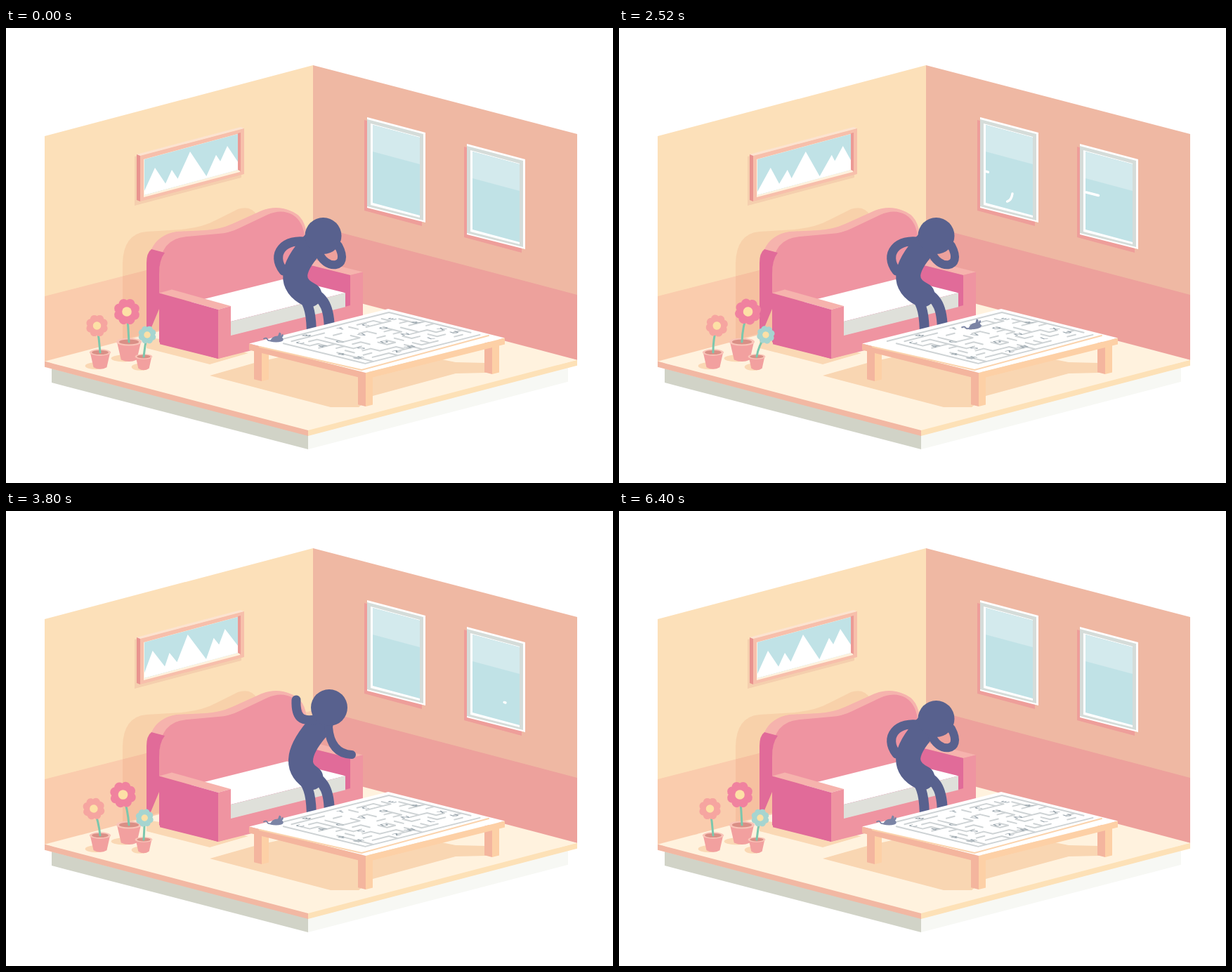
Recreate the animation shown at these times as an HTML page. Size 864 by 648 pixels, loop 6.92 s.

```html
<!DOCTYPE html>
<html lang="en">
<head>
<meta charset="utf-8">
<title>Maze on the table</title>
<style>
html, body { margin: 0; width: 100%; height: 100%; overflow: hidden; background: #fff; }
svg { display: block; width: 100%; height: 100%; }
.line { fill: none; stroke-linecap: round; stroke-linejoin: round; }
#letters { font: 700 13px "Open Sans", sans-serif; fill: #98a4ac; text-anchor: middle; }
</style>
</head>
<body>
<svg viewBox="0 0 864 648">
  <defs>
    <clipPath id="view"><path d="M197 187 330 151V202L197 238z"/></clipPath>
    <g id="window">
      <path fill="#ee9e9a" d="M510 131 592 153V282L510 260z"/>
      <path fill="#fff" d="M514 127 597 149V277L514 256z"/>
      <path fill="#d5dcd9" d="M514 130 594 151V274L514 254z"/>
      <path fill="#fff" d="M519 136 589 155V270L519 252z"/>
      <path fill="#c0e2e6" d="M522 138 589 156V267L522 249z"/>
      <path fill="#d3eaed" d="M522 138 589 156V194L522 176z"/>
    </g>
  </defs>

  <!-- walls and floor -->
  <path fill="#fce0b9" d="M55 154 437 53V380L55 480z"/>
  <path fill="#faccad" d="M55 382 437 284V380L55 480z"/>
  <path fill="#efb8a3" d="M437 53 813 151V473L437 380z"/>
  <path fill="#eda19c" d="M437 281 813 380V473L437 380z"/>
  <g id="floor"></g>

  <!-- picture -->
  <path fill="#f5cfae" d="M183 183 335 145V213L183 253z"/>
  <path fill="#fce3d0" d="M186 180 334 141 339 143 191 183z"/>
  <path fill="#e9938f" d="M186 180 191 182V247L186 245z"/>
  <path fill="#f7bfab" d="M191 182 339 143V208L191 247z"/>
  <path fill="#fff2de" d="M196 187 333 150V205L196 241z"/>
  <path fill="#ec9a95" d="M330 150 334 149V204L330 202z"/>
  <g clip-path="url(#view)">
    <path fill="#c0e2e6" d="M190 140H340V250H190z"/>
    <path id="peaks" fill="#fff"/>
  </g>

  <use href="#window"/>
  <use href="#window" x="142" y="38"/>
  <g id="gusts" class="line" stroke="#fff" stroke-width="3.4"></g>

  <!-- sofa -->
  <path fill="#dd8060" opacity=".16" d="M166 444V335Q167 293 200 290L250 287Q280 284 300 273L330 258Q348 252 357 266V390L200 435z"/>
  <path fill="#fad8b4" d="M200 456 290 479 345 463 200 440z"/>
  <path fill="#f6b3ad" d="M207 315Q217 294 243 290L284 288Q304 287 322 279L364 260Q385 252 404 260Q428 268 428 300L320 340 224 330z"/>
  <path fill="#ef94a1" d="M218 345Q219 299 258 297L302 293Q318 292 332 285L372 266Q392 257 408 266Q424 276 425 300V362L286 390 218 378z"/>
  <path fill="#e16b99" d="M200 443V335Q200 320 207 315L226 320Q218 330 218 350V400z"/>
  <g id="sofa"></g>

  <g id="person" class="line" stroke="#58618e"></g>
  <circle id="head" r="26" fill="#58618e"/>

  <!-- table -->
  <path fill="#f9d6b2" d="M290 495 357 476 420 462 610 470 640 476 683 477V491L640 492 522 524 502 540H462z"/>
  <g id="table"></g>
  <path class="line" stroke="#fbd3ac" stroke-width="2" d="M361 454 506 487 687 438"/>
  <path id="maze" class="line" stroke="#ced3d5" stroke-width="2"/>
  <g id="letters"></g>
  <g id="mouse">
    <path class="line" stroke="#7b84a5" stroke-width="1.8" d="M-6 2Q-12 4-13 1T-18 0"/>
    <path fill="#7b84a5" d="M-9 4Q-7-4 2-4L4-9Q8-8 6-4L9-7Q11-4 8-2Q12 2 7 4Q0 6-9 4z"/>
  </g>
  <g id="flowers"></g>
</svg>

<script>
const LOOP = 6920, STEP = 40;
const $ = id => document.getElementById(id);

function set(el, attrs) {
  for (const k in attrs) el.setAttribute(k, attrs[k]);
}
function add(parent, tag, attrs = {}) {
  const el = document.createElementNS('http://www.w3.org/2000/svg', tag);
  set(el, attrs);
  return parent.appendChild(el);
}
const clamp = x => Math.max(0, Math.min(1, x));
const smooth = x => x * x * (3 - 2 * x);
const mix = (a, b, k) => a + (b - a) * k;
const progress = (t, from, to) => clamp((t - from) / (to - from));
// Rises from 0 to 1, rests, and falls back
const there = (t, a, b, c, d) => progress(t, a, b) - progress(t, c, d);
// Repeated 0-1-0 swing between two times
const swing = (t, from, to, count) => Math.sin(Math.PI * count * progress(t, from, to)) ** 2;

let seed = 11;
const random = () => (seed = (seed * 16807) % 2147483647) / 2147483647;

// Isometric box from its front top corner, with reach to the left and right
function box(parent, x, y, left, right, height, [top, leftFace, rightFace], slope = .25) {
  const l = -left * slope, r = -right * slope;
  add(parent, 'path', { fill: top, d: `M${x} ${y}l${-left} ${l} ${right} ${r} ${left} ${-l}z` });
  add(parent, 'path', { fill: leftFace, d: `M${x} ${y}l${-left} ${l}v${height}l${left} ${-l}z` });
  add(parent, 'path', { fill: rightFace, d: `M${x} ${y}l${right} ${r}v${height}l${-right} ${-r}z` });
}

box($('floor'), 430, 580, 365, 370, 20, ['#fff2de', '#d1d3c7', '#f7f8f4'], .26);
box($('floor'), 430, 573, 375, 383, 8, ['#fff2de', '#f2b8a3', '#fde1b7'], .262);

const pink = ['#f6b3ad', '#e16b99', '#ef94a1'], wood = ['#fff', '#f4b59e', '#fdd0a6'];
box($('sofa'), 490, 352, 72, 18, 73, pink);
box($('sofa'), 302, 442, 83, 188, 29, ['#e16b99', '#e16b99', '#ef94a1']);
box($('sofa'), 320, 418, 83, 163, 20, ['#fff', '#fff', '#dfe0da']);
box($('sofa'), 302, 401, 84, 18, 70, pink, .28);
for (const [x, y] of [[692, 448], [364, 458], [512, 494]]) box($('table'), x, y, 11, 10, 45, wood);
box($('table'), 512, 491, 166, 198, 9, wood);

// Point on the table top, u and v from 0 to 1
const onTable = (u, v) => [346 + 199 * u + 166 * v, 450 - 50 * u + 41 * v].map(n => n.toFixed(1));
const inMaze = (u, v) => onTable(.13 + .82 * u, .06 + .78 * v);

function mazePath(cols, rows) {
  const at = (c, r) => inMaze(c / cols, r / rows);
  let d = `M${at(0, 1)}L${at(0, rows)}L${at(cols, rows)}M${at(cols, rows - 1)}L${at(cols, 0)}L${at(0, 0)}`;
  for (let c = 1; c < cols; c++) {
    for (let r = 1; r < rows; r++) {
      const pick = random();
      if (pick < .4) d += `M${at(c, r)}L${at(c + 1, r)}`;
      else if (pick < .74) d += `M${at(c, r)}L${at(c, r + 1)}`;
    }
  }
  return d;
}
set($('maze'), { d: mazePath(14, 10) });

[...'CBTCEACVORPSDNXMZWLU'].forEach((letter, i) => {
  const u = (i % 5 + .2 + .6 * random()) / 5, v = ((i / 5 | 0) + .2 + .6 * random()) / 4;
  const turn = Math.round(random() * 40 - 20);
  add($('letters'), 'text', {
    y: 4.5, transform: `matrix(.97 -.24 .85 .22 ${inMaze(u, v).join(' ')}) rotate(${turn})`
  }).textContent = letter;
});

// Pot position, head position, head radius and colour
const flowers = [
  [175, 447, 172, 404, 19, '#f0829f'],
  [134, 462, 129.5, 424, 16, '#f6a5a0'],
  [196, 468, 201, 437, 13, '#a6d5d0']
].map(([x, y, headX, headY, r, color]) => {
  const g = $('flowers'), w = r * .95, h = r * 1.45, foot = w * .62;
  add(g, 'ellipse', { cx: x - w * .4, cy: y + h - 4, rx: w, ry: 5, fill: '#fad8b4' });
  add(g, 'path', { fill: '#f2a09f', d: `M${x - w + 1} ${y}L${x - foot} ${y + h - 2}Q${x} ${y + h + 3} ${x + foot} ${y + h - 2}L${x + w - 1} ${y}z` });
  add(g, 'ellipse', { cx: x, cy: y, rx: w, ry: w * .31, fill: '#f9c4b8' });
  add(g, 'ellipse', { cx: x, cy: y, rx: w * .78, ry: w * .2, fill: '#d98f86' });
  const stem = add(g, 'path', { class: 'line', stroke: '#7cc7ad', 'stroke-width': 3 });
  const head = add(g, 'g');
  for (let a = .5; a < 8; a++) {
    add(head, 'circle', { cx: r * .62, r: r * .37, fill: color, transform: `rotate(${a * 45})` });
  }
  add(head, 'circle', { r: r * .7, fill: color });
  add(head, 'circle', { r: r * .36, fill: '#fde0a6' });
  return { x, y, headX, headY, r, stem, head };
});

// Gusts of wind seen through the windows
const gusts = [
  [2040, 2680, 'M527 242L545 247Q558 250 560 236'],
  [2490, 3160, 'M521 204L558 214Q573 216 572 204Q569 194 561 201'],
  [2800, 3360, 'M526 230L543 234Q554 237 553 226Q552 220 546 222'],
  [2400, 3110, 'M665 234L700 243Q716 246 716 234Q712 224 708 231L709 237'],
  [3240, 3820, 'M672 262L711 273']
].map(([from, to, d]) => ({ from, to, el: add($('gusts'), 'path', { d, pathLength: 1 }) }));

// Each limb is one thick cubic stroke: thinking pose, startled pose
function limb(width, thinking, startled = thinking) {
  const el = add($('person'), 'path', { 'stroke-width': width });
  return k => {
    const p = thinking.map((n, i) => mix(n, startled[i], k));
    return { p, draw: () => set(el, { d: `M${p.slice(0, 2)}C${p.slice(2)}` }) };
  };
}
limb(14, [420, 380, 432, 392, 435, 410, 435, 440])(0).draw();
limb(15, [434, 376, 454, 384, 462, 402, 460, 440])(0).draw();
const torso = limb(35, [438, 307, 405, 342, 403, 366, 432, 380], [448, 304, 415, 340, 411, 365, 434, 380]);
const leftArm = limb(13, [430, 305, 396, 298, 376, 322, 395, 346], [440, 297, 420, 300, 412, 294, 413, 269]);
const rightArm = limb(12, [445, 318, 452, 345, 492, 345, 473, 310], [459, 308, 461, 333, 472, 346, 492, 347]);

function drawPerson(t) {
  const k = smooth(there(t, 3440, 3640, 5800, 6400));
  const scratch = swing(t, 0, 1500, 4), wave = swing(t, 3800, 5440, 5);
  const left = leftArm(k), right = rightArm(k);
  left.p[6] += 9 * wave;
  left.p[7] -= 6 * wave;
  right.p[6] += 2 * scratch;
  right.p[7] -= 9 * scratch;
  [torso(k), left, right].forEach(part => part.draw());
  set($('head'), { cx: mix(451.5, 460, k), cy: mix(296, 280, k) });
}

function drawMouse(t) {
  const k = there(t, 780, 1880, 2560, 3640);
  const facing = t > 2560 && t < 3640 ? -1 : 1;
  const hop = k % 1 ? Math.abs(Math.sin(t / 55)) * 1.5 : 0;
  set($('mouse'), {
    transform: `translate(${mix(385, 506, k)} ${mix(442.5, 424, k) - hop}) rotate(${-8 * clamp(k * 8)}) scale(${facing} 1)`
  });
}

// Bends with the wind, then swings out like a spring
function leanAt(t) {
  const s = Math.max(0, t - 3340) / 1000;
  return smooth(progress(t, 2040, 3080)) * Math.exp(-3.4 * s) * Math.cos(7 * s);
}

// One triangle per mountain, feet on the sloping picture edge
function mountain(x, height, shift) {
  const base = at => 238 - .267 * (at - 197);
  const left = x - height * .517, right = x + height * .566;
  return `M${left} ${base(left)}L${x + shift} ${base(x) - height}L${right} ${base(right)}z`;
}

function drawWind(t) {
  const lean = t < 5400 ? leanAt(t) : 0;

  for (const f of flowers) {
    const bend = lean * f.r * 1.38, x = f.headX + bend;
    set(f.head, { transform: `translate(${x} ${f.headY}) rotate(${lean * 20})` });
    set(f.stem, { d: `M${f.x} ${f.y}Q${mix(f.x, f.headX, .3) + bend * .12} ${mix(f.y, f.headY, .5)} ${x} ${f.headY}` });
  }

  const shift = lean * (lean > 0 ? 8.5 : 16);
  const peaks = [[212, 35], [236, 25.6], [262, 44.6], [299, 30], [315, 38.5]];
  set($('peaks'), { d: peaks.map(([x, height]) => mountain(x, height, shift)).join('') });

  for (const { from, to, el } of gusts) {
    const head = (t - from) / (to - from) * 1.4;
    const start = clamp(head - .4), length = clamp(head) - start;
    set(el, {
      visibility: length > 0 ? 'visible' : 'hidden',
      'stroke-dasharray': `${length} 3`,
      'stroke-dashoffset': -start
    });
  }
}

function frame() {
  const now = performance.now() % LOOP, t = now - now % STEP;
  drawPerson(t);
  drawMouse(t);
  drawWind(t);
  requestAnimationFrame(frame);
}
frame();
</script>
</body>
</html>
```
